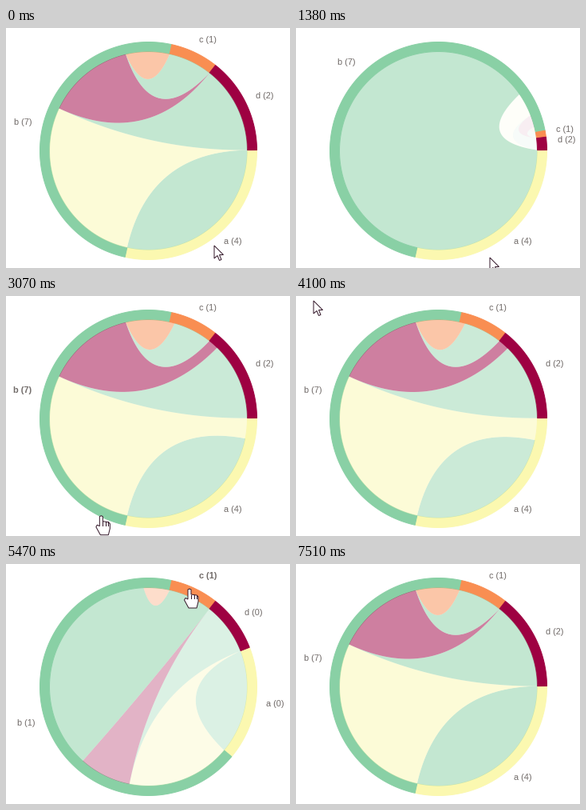
Animation of 356x300 px, one loop 8200 ms. Source, as a matplotlib script:

```python
import numpy as np
import matplotlib.pyplot as plt
from matplotlib.animation import FuncAnimation
from matplotlib.patches import Polygon

W, H, DPI = 356, 300, 100
PX = 72 / DPI
LOOP, INTERVAL = 8200, 40
TICK, LAST_STEP = LOOP / 24, 22
CENTER = np.array([178.5, 153.5])
INNER, OUTER, LABEL_R = 124, 136, 149.5
TILT = -0.4
EASE_MS = 750

NAMES = "abcd"
VALUES = dict(a=4, b=7, c=1, d=2)
UNIT = 360 / sum(VALUES.values())
COLORS = dict(a="#fbf8b0", b="#89d0a5", c="#f98e52", d="#9e0142")
B_ORDER = "adc"
INK = "#34182a"

# Group under the pointer, with start and end in ms.
HOVERS = [("a", 30, 1125), ("b", 2845, 3586), ("c", 5117, 6234)]

# Key points of the pointer's path: step, x, y.
PATH = [(0, 261, 272), (1, 256, 261), (3, 255, 260), (4, 243, 287),
        (6, 209, 287), (7, 116, 278), (10, 121, 273), (11, 22, 6),
        (12, 22, 6), (15, 230, 31)]
POINTER_GONE = 19

ARROW = [(0, 0), (0, 16), (4, 12.5), (6.5, 18.5), (9, 17.5), (6.5, 11.5),
         (11.5, 11.5)]
HAND = [(-2, 13), (-2, 1), (0, 0), (2, 1), (2, 7), (9, 8), (11, 10),
        (11, 16), (9, 24), (-1, 24), (-6.5, 14), (-5, 11.5)]


def ease(u):
    u = min(max(u, 0), 1)
    return 4 * u**3 if u < 0.5 else 1 - 4 * (1 - u) ** 3


def hover_state(t):
    """Layout focus, share of the full layout, and whether hovering is on."""
    for name, start, end in HOVERS:
        if start <= t < end:
            return name, 1 - ease((t - start) / EASE_MS), True
        if end <= t < end + EASE_MS:
            return name, ease((t - end) / EASE_MS), False
    return None, 1, False


def polar(r, deg):
    a = np.radians(np.asarray(deg) + TILT)
    return CENTER + r * np.stack([np.cos(a), np.sin(a)], axis=-1)


def arc(r, a0, a1):
    return polar(r, np.linspace(a0, a1, int(abs(a1 - a0)) + 2))


def curve(a0, a1):
    """Quadratic curve, pulled less to the centre when its ends are close."""
    turn = (a1 - a0 + 180) % 360 - 180
    pull = (1 - np.sin(np.radians(abs(turn) / 2))) ** 3
    ctrl = polar(INNER * pull, a0 + turn / 2)
    t = np.linspace(0, 1, 40)[:, None]
    return ((1 - t) ** 2 * polar(INNER, a0) + 2 * t * (1 - t) * ctrl
            + t**2 * polar(INNER, a1))


def group_arcs(focus, p):
    """Angles of each group; a focused group keeps its place, b fills up."""
    full = {n: VALUES[n] * UNIT for n in NAMES}
    width = dict(full)
    first = "a"
    if focus in ("a", "c", "d"):
        first = focus
        for n in B_ORDER:
            if n != focus:
                width[n] *= p
        width["b"] = 360 - sum(width[n] for n in B_ORDER)
    i = NAMES.index(first)
    angle = sum(full[n] for n in NAMES[:i])
    arcs = {}
    for n in NAMES[i:] + NAMES[:i]:
        arcs[n] = angle, angle + width[n]
        angle += width[n]
    return arcs


def ribbons(focus, p, arcs):
    """Yield (from, to, colour, alpha) for each group's link pair with b."""
    pos, b_end = arcs["b"]
    scale = 1 if focus in (None, "b") else p
    spare = b_end - pos - scale * VALUES["b"] * UNIT
    for n in B_ORDER:
        x0, x1 = arcs[n]
        split = x0 + (x1 - x0) * (1 - p) if focus == "b" else x0
        grown = pos + (spare if n == focus else 0)
        out_end = grown + scale * VALUES[n] * UNIT
        in_alpha = 0.5 if n == focus else 0.5 * p
        out_alpha = 0.5 if focus == "b" else 0.5 * p
        yield (split, x1), (pos, grown), COLORS["b"], in_alpha
        yield (grown, out_end), (x0, split), COLORS[n], out_alpha
        pos = out_end


def add_polygon(points, **style):
    ax.add_patch(Polygon(points, closed=True, joinstyle="miter", **style))


def draw_ribbon(src, dst, color, alpha):
    outline = np.vstack([arc(INNER, *src), curve(src[1], dst[0]),
                         arc(INNER, *dst), curve(dst[1], src[0])])
    add_polygon(outline, fc=color, alpha=alpha, lw=0)


def draw_labels(arcs, hovered):
    for n in NAMES:
        value = VALUES[n]
        if hovered not in (None, "b", n):
            value = VALUES[hovered] if n == "b" else 0
        x, y = polar(LABEL_R, sum(arcs[n]) / 2)
        ax.text(x, y, f"{n} ({value})", color="#726c6a", fontsize=11 * PX,
                family="Liberation Sans", va="baseline",
                ha="left" if x >= CENTER[0] else "right",
                weight="bold" if n == hovered else "normal")


def draw_pointer(step, over_group):
    steps, xs, ys = zip(*PATH)
    x, y = np.interp(step, steps, xs), np.interp(step, steps, ys)
    shape = np.array(HAND if over_group else ARROW) + (x, y)
    add_polygon(shape, fc="white", ec=INK, lw=PX)
    if over_group:
        for dx in (2, 5.5, 9):
            ax.plot([x + dx] * 2, [y + 7.5, y + 12], color=INK, lw=PX)


def draw(frame):
    ax.clear()
    ax.set(xlim=(0, W), ylim=(H, 0))
    ax.axis("off")
    step = min(int((frame * INTERVAL + INTERVAL - 1) / TICK), LAST_STEP)
    focus, p, active = hover_state(step * TICK)
    arcs = group_arcs(focus, p)
    for n in NAMES:
        a0, a1 = arcs[n]
        band = np.vstack([arc(OUTER, a0, a1), arc(INNER, a1, a0)])
        add_polygon(band, fc=COLORS[n], ec=COLORS[n], lw=PX)
    for link in ribbons(focus, p, arcs):
        draw_ribbon(*link)
    draw_labels(arcs, focus if active else None)
    if step < POINTER_GONE:
        draw_pointer(step, active)


fig = plt.figure(figsize=(W / DPI, H / DPI), dpi=DPI, facecolor="white")
ax = fig.add_axes([0, 0, 1, 1])
anim = FuncAnimation(fig, draw, frames=LOOP // INTERVAL, interval=INTERVAL,
                     init_func=lambda: None, repeat=True, repeat_delay=0)
plt.show()
```
